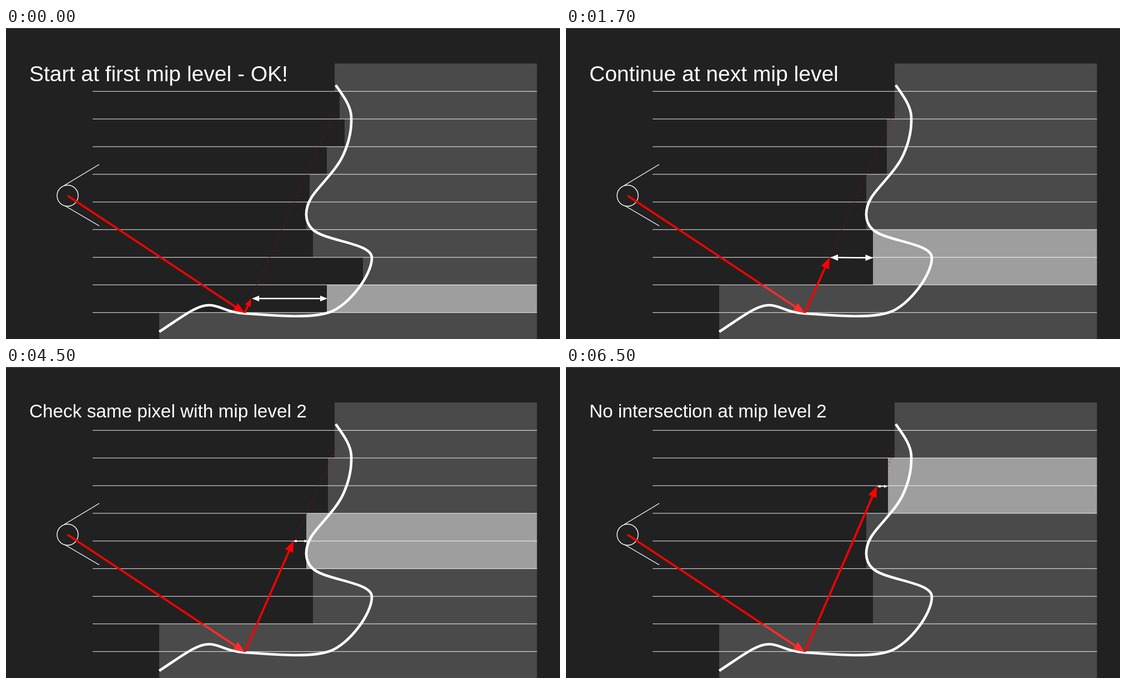
An HTML page with a canvas for the animation above (8 s loop, 998 by 561 pixels).

```html
<!DOCTYPE html>
<html lang="en">
<head>
<meta charset="utf-8">
<title>Mip level ray march</title>
<style>
html, body { margin: 0; width: 100%; height: 100%; overflow: hidden; background: #212121; }
canvas { display: block; }
</style>
</head>
<body>
<canvas id="stage" width="998" height="561"></canvas>
<script>
const ctx = document.getElementById('stage').getContext('2d');
const LOOP = 8000, RIGHT = 956.5, RED = '#f00';
const HIT = [430, 514], EYE = [111, 302.5];

// Height of the upper edge of a depth row
const rowY = i => i === 10 ? 561 : 64.4 + i * 49.88;

const surface = new Path2D(
  'M276 548C316 522 342 500 366 500C386 500 396 513 430 515C480 518 545 525 582 513' +
  'C618 501 660 444 659 414C658 387 574 385 552 363C537 349 538 326 550 306' +
  'C562 286 595 258 608 228C617 208 623 184 622 160C621 138 604 118 594 103');

// cells: [first row, end row, left edge]; lit: index of the highlighted cell
const coarse = [[0, 2, 592], [2, 4, 580], [4, 6, 541], [6, 8, 553], [8, 10, 276]];
const slides = [
  { start: 0, title: 'Start at first mip level - OK!', size: 39, lit: 8,
    cells: [592, 601, 610, 578, 547, 541, 553, 643, 578, 276].map((x, i) => [i, i + 1, x]),
    tip: [441.5, 488], head: 14, gap: [443, 488, 579, 488, 2.5, 13] },
  { start: 500, title: 'Continue at next mip level', size: 39, lit: 3,
    cells: coarse.map(([a, b, x], i) => [a, b, i === 1 ? 578 : x]),
    tip: [475, 414], head: 20, gap: [476, 414, 553.5, 414.5, 2.5, 14] },
  { start: 2500, title: 'Intersection at 3 mip level!', size: 39, lit: 1,
    cells: [[0, 2, 592], [2, 6, 541], [6, 10, 276]],
    tip: [543, 265], head: 20, hit: true },
  { start: 4500, title: 'Check same pixel with mip level 2', size: 33.3, lit: 2,
    cells: coarse, tip: [518, 313.5], head: 20, gap: [517, 314, 544, 314, 1.6, 6.5] },
  { start: 6500, title: 'No intersection at mip level 2', size: 33.3, lit: 1,
    cells: coarse, tip: [560, 215], head: 20, gap: [560, 215.3, 579.5, 215.3, 1.6, 6.5] }
];

function line(x1, y1, x2, y2, color, width) {
  ctx.strokeStyle = color;
  ctx.lineWidth = width;
  ctx.beginPath();
  ctx.moveTo(x1, y1);
  ctx.lineTo(x2, y2);
  ctx.stroke();
}

function arrowHead(x, y, angle, size, color) {
  ctx.save();
  ctx.translate(x, y);
  ctx.rotate(angle);
  ctx.fillStyle = color;
  ctx.beginPath();
  ctx.moveTo(0, 0);
  ctx.lineTo(-size, -size * 0.4);
  ctx.lineTo(-size, size * 0.4);
  ctx.fill();
  ctx.restore();
}

function arrow([x1, y1], [x2, y2], color, width, size, both) {
  const angle = Math.atan2(y2 - y1, x2 - x1);
  const dx = Math.cos(angle) * size * 0.8, dy = Math.sin(angle) * size * 0.8;
  line(x1 + (both ? dx : 0), y1 + (both ? dy : 0), x2 - dx, y2 - dy, color, width);
  arrowHead(x2, y2, angle, size, color);
  if (both) arrowHead(x1, y1, angle + Math.PI, size, color);
}

function text(str, x, y, size) {
  ctx.font = `${size}px "Liberation Sans", Arial, sans-serif`;
  ctx.fillStyle = '#fff';
  ctx.fillText(str, x, y);
}

function drawCells(s) {
  s.cells.forEach(([a, b, x], i) => {
    const top = Math.round(rowY(a));
    ctx.fillStyle = i === s.lit ? '#9e9e9e' : '#4a4a4a';
    ctx.fillRect(x, top, RIGHT - x, Math.round(rowY(b)) - top);
  });
  for (let i = 1; i < 10; i++)
    line(156, rowY(i), RIGHT, rowY(i), 'rgba(255,255,255,.75)', 1.3);
}

function drawCamera() {
  line(105, 284, 168, 246, '#fff', 1.4);
  line(105, 320, 168, 357, '#fff', 1.4);
  ctx.beginPath();
  ctx.arc(...EYE, 19, 0, 2 * Math.PI);
  ctx.stroke();
}

function drawRays(s) {
  arrow(EYE, HIT, RED, 3.6, 20);
  const [row, , left] = s.cells[s.cells.length - 1];
  if (row < 9) {
    // The ray is paler where it runs through the bottom cell
    ctx.save();
    ctx.beginPath();
    ctx.rect(left, rowY(row), 300, 300);
    ctx.clip();
    arrow(EYE, HIT, '#ff2e2e', 3.6, 20);
    ctx.restore();
  }
  arrow(HIT, s.tip, RED, 3.6, s.head);
}

function drawSlide(s) {
  ctx.fillStyle = '#212121';
  ctx.fillRect(0, 0, 998, 561);
  ctx.fillStyle = '#4c4c4c';
  ctx.fillRect(0, 0, 998, 1);
  drawCells(s);
  drawCamera();

  ctx.setLineDash(s.hit ? [2.6, 4.2] : [1.6, 5.2]);
  line(...HIT, 606, 120, s.hit ? '#8c1212' : '#9a0a0a', s.hit ? 2.6 : 1.5);
  ctx.setLineDash([]);

  ctx.strokeStyle = '#fff';
  ctx.lineWidth = 4.6;
  ctx.stroke(surface);
  drawRays(s);

  if (s.gap) {
    const [x1, y1, x2, y2, width, head] = s.gap;
    arrow([x1, y1], [x2, y2], '#fff', width, head, true);
  }
  if (s.hit) {
    text('Intersection!', 344.5, 236, 19.7);
    arrow([455, 236], [544, 264.5], '#fff', 2, 13);
  }
  text(s.title, 42, s.size > 35 ? 96 : 90.5, s.size);
}

const begin = performance.now();
function tick() {
  const t = (performance.now() - begin) % LOOP;
  drawSlide(slides.filter(s => s.start <= t).pop());
  requestAnimationFrame(tick);
}
tick();
</script>
</body>
</html>
```
